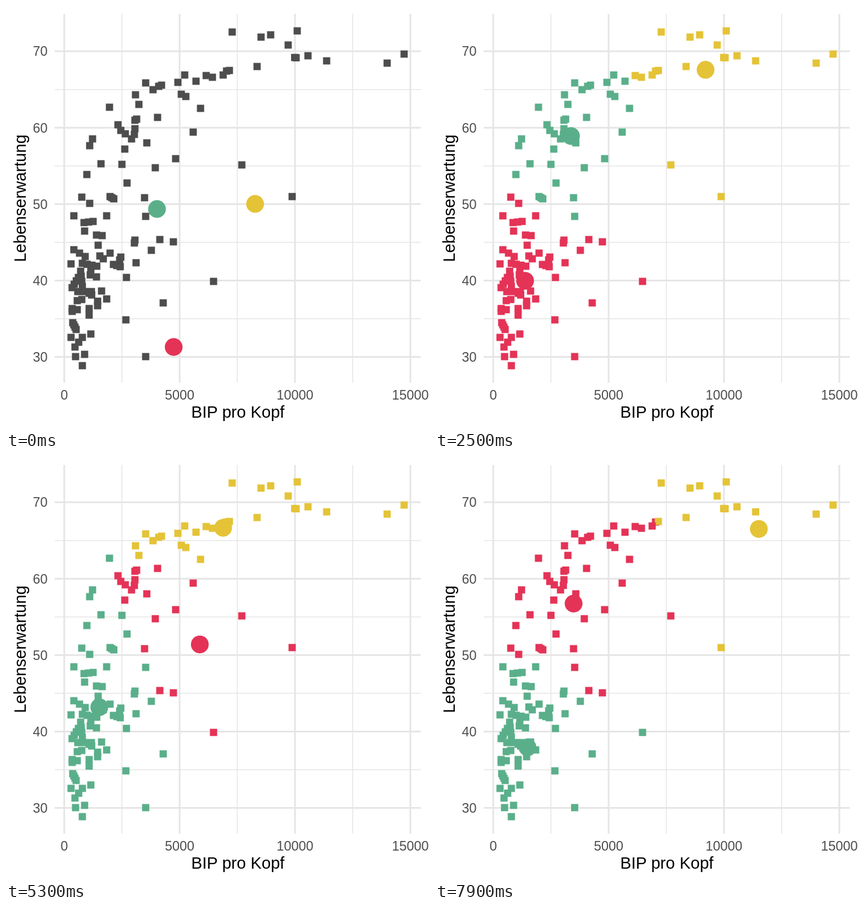
Recreate the animation shown at these times as an HTML page. Size 748x748 px, loop 8000 ms.

```html
<!DOCTYPE html>
<html lang="de">
<head>
<meta charset="utf-8">
<title>k-Means</title>
<style>
  html, body { margin: 0; width: 100%; height: 100%; overflow: hidden; background: #fff; }
  svg { display: block; width: 100vw; height: 100vh; }
  text { font-family: "Liberation Sans", Arial, sans-serif; }
</style>
</head>
<body>
<svg id="stage" viewBox="0 0 748 748"></svg>
<script>
const LOOP = 8000, STEPS = 12;
const GREY = '#4d4d4d';
const COLORS = ['#e43357', '#e4c337', '#5aaf8a'];
// Distances use standardised axes: squared weight of x relative to y.
const X_WEIGHT = 1.865;

const stage = document.getElementById('stage');

function add(tag, attrs, text = '') {
  const node = document.createElementNS('http://www.w3.org/2000/svg', tag);
  for (const key in attrs) node.setAttribute(key, attrs[key]);
  node.textContent = text;
  return stage.appendChild(node);
}

// Axes
const gridX = i => 103 + 102 * i;
const gridY = i => 620.5 - 67.55 * i;

function drawAxes() {
  for (const major of [false, true]) {
    const line = d => add('path', { d, stroke: '#e5e5e5', 'stroke-width': major ? 3 : 1.5 });
    for (let i = major ? 0 : 1; i < 7; i += 2) line(`M${gridX(i)} 14V666`);
    for (let i = major ? 0 : 1; i < 9; i += 2) line(`M86 ${gridY(i)}H733.5`);
  }
  const tick = { fill: GREY, 'font-size': 23.4 };
  for (let i = 0; i < 4; i++)
    add('text', { ...tick, x: gridX(2 * i), y: 696, 'text-anchor': 'middle' }, 5000 * i);
  for (let i = 0; i < 5; i++)
    add('text', { ...tick, x: 73.5, y: gridY(2 * i) + 8.3, 'text-anchor': 'end' }, 30 + 10 * i);
  const title = { 'font-size': 29.2, 'text-anchor': 'middle' };
  add('text', { ...title, x: 410, y: 728 }, 'BIP pro Kopf');
  add('text', { ...title, transform: 'translate(34.5 340) rotate(-90)' }, 'Lebenserwartung');
}

// Data
const points = [
  [400, 46], [451, 55], [468, 51], [515, 44], [499, 69], [534, 88], [567, 97], [674, 101],
  [704, 85], [444, 107], [390, 115], [395, 114], [384, 122], [365, 126], [354, 123],
  [336, 133], [316, 122], [304, 135], [310, 156], [318, 160], [344, 181], [331, 223],
  [417, 281], [506, 337], [367, 487], [300, 270], [247, 136], [260, 148], [270, 142],
  [275, 140], [229, 157], [235, 174], [183, 179], [268, 197], [198, 210], [203, 220],
  [228, 217], [227, 227], [222, 235], [211, 226], [210, 253], [249, 242], [148, 247],
  [153, 235], [168, 279], [205, 280], [264, 286], [214, 313], [143, 298], [134, 338],
  [148, 349], [245, 339], [247, 372], [178, 371], [120, 371], [296, 417], [272, 413],
  [257, 432], [278, 525], [247, 620], [212, 555], [230, 454], [213, 480], [178, 518],
  [169, 504], [135, 636], [150, 580], [115, 586], [139, 398], [163, 423], [184, 437],
  [115, 456]
];

// Evenly spaced strand of n points
function strand(x, y, dx, dy, n) {
  for (let i = 0; i < n; i++) points.push([x + i * dx, y + i * dy]);
}

strand(510.5, 91, 2.5, 0.5, 2);
strand(228, 202, 3, -2, 2);
strand(184, 337, 3.3, 2, 3);
strand(228, 414, -1, 5, 2);
strand(138, 383, 8, -1, 3);
strand(160, 405, 10, 1, 2);
strand(120, 431, 10, 6, 3);
strand(166, 442, 6, 5, 2);
strand(135, 455, 8.5, 1.7, 4);
strand(190, 457, 6, 2, 3);
strand(201, 449, 2, -5, 2);
strand(150, 466, -1, 9.5, 2);
strand(160, 479, 0, 0, 1);
strand(132, 469, 1, 9, 4);
strand(128, 480, -3.7, 6, 4);
strand(127, 505, 12, 0, 3);
strand(147, 508, 4.5, 3, 2);
strand(126, 521, 8, -2, 2);
strand(162, 522, 0, 8, 2);
strand(117, 535, 0, 5, 2);
strand(126, 537, 0, 0, 1);
strand(147, 535, 0, 11.5, 2);
strand(118, 560, 2, 4, 4);
strand(135, 586, -6.5, 8.5, 3);
strand(123, 620, 16, -4, 2);

// k-means
const distance = ([x, y], [cx, cy]) => X_WEIGHT * (x - cx) ** 2 + (y - cy) ** 2;

const assign = centers => points.map(p => {
  const d = centers.map(c => distance(p, c));
  return d.indexOf(Math.min(...d));
});

const average = (list, axis) => list.reduce((sum, p) => sum + p[axis], 0) / list.length;

const update = (centers, labels) => centers.map((center, k) => {
  const members = points.filter((_, i) => labels[i] === k);
  return members.length ? [average(members, 0), average(members, 1)] : center;
});

// Start time, time of the first colouring, starting centres (red, yellow, green)
const runs = [
  { start: 0, colored: 700, centers: [[296.5, 603], [440.5, 350], [267, 359]] },
  { start: 3300, colored: 4100, centers: [[594, 535.5], [437, 113.5], [333.5, 266]] },
  { start: 6700, colored: 7500, centers: [[280.5, 240], [564.5, 424.5], [350, 515]] }
];

const states = [];
for (const { start, colored, centers: initial } of runs) {
  let centers = initial;
  states.push({ time: start, centers, labels: null });
  for (let step = 0; step < STEPS; step++) {
    const labels = assign(centers);
    states.push({ time: colored + (step && 200 + 200 * step), centers, labels });
    centers = update(centers, labels);
  }
}

// Rendering
drawAxes();
const circles = COLORS.map(fill => add('circle', { r: 15.7, fill }));
const squares = points.map(([x, y]) =>
  add('rect', { x: x - 6.4, y: y - 6.4, width: 12.8, height: 12.8 }));

let shown = null;

function render(time) {
  const state = states.filter(s => s.time <= time && s.time < LOOP).pop();
  if (state === shown) return;
  shown = state;
  circles.forEach((circle, k) => {
    circle.setAttribute('cx', state.centers[k][0]);
    circle.setAttribute('cy', state.centers[k][1]);
  });
  squares.forEach((square, i) =>
    square.setAttribute('fill', state.labels ? COLORS[state.labels[i]] : GREY));
}

const origin = performance.now();
function tick() {
  render((performance.now() - origin) % LOOP);
  requestAnimationFrame(tick);
}
tick();
</script>
</body>
</html>
```
